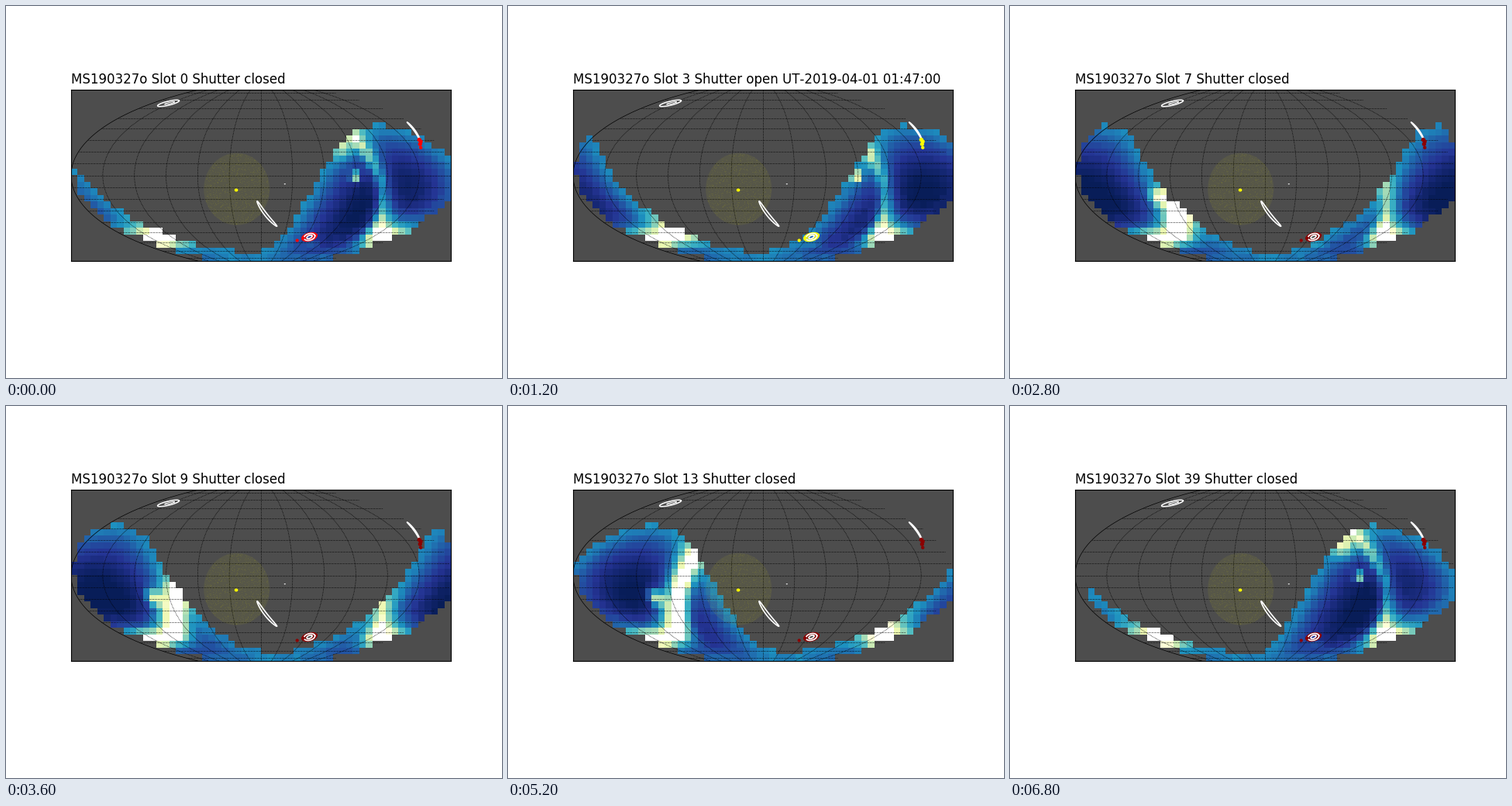
Write a matplotlib script that moves like this. It is 640 px wide and 480 px high and loops after 7.2 s.

```python
import numpy as np
import matplotlib.pyplot as plt
from matplotlib.animation import FuncAnimation
from matplotlib.patches import Ellipse, RegularPolygon

plt.rcParams["text.kerning_factor"] = 6

LEFT, RIGHT, TOP, BOTTOM = 84.0, 574.0, 108.3, 328.9
CX, CY = (LEFT + RIGHT) / 2, (TOP + BOTTOM) / 2
HALF_W, HALF_H = (RIGHT - LEFT) / 2, (BOTTOM - TOP) / 2
COLS, ROWS = 58, 26
NSIDE = 32
SLOTS = list(range(17)) + [39]
OPEN_SLOT = 3
SITE_LAT, ZENITH_LIMIT = -30.17, 64.5


def project(ra, dec, cx=CX, cy=CY):
    """McBryde-Thomas flat-polar quartic, degrees to pixels."""
    t = np.linspace(-np.pi / 2, np.pi / 2, 4001)
    theta = np.interp((1 + np.sqrt(0.5)) * np.sin(np.radians(dec)),
                      np.sin(t / 2) + np.sin(t), t)
    width = (1 + 2 * np.cos(theta) / np.cos(theta / 2)) / 3
    x = cx + HALF_W * ra / 180 * width
    y = cy - HALF_H * np.sin(theta / 2) / np.sqrt(0.5)
    return x, y


def healpix_centres(n):
    """RA (-180..180) and Dec of all pixel centres, ring by ring."""
    ra, dec = [], []
    for i in range(1, 4 * n):
        k = min(i, 4 * n - i)
        if k < n:
            z, count, shift = 1 - k * k / (3 * n * n), 4 * k, 0.5
            z = z if i < n else -z
        else:
            z, count = 4 / 3 - 2 * i / (3 * n), 4 * n
            shift = 0.5 * ((i - n + 1) % 2)
        ra.append((np.arange(count) + shift) * 360 / count)
        dec.append(np.full(count, np.degrees(np.arcsin(z))))
    return (np.concatenate(ra) + 180) % 360 - 180, np.concatenate(dec)


def separation(ra, dec, ra0, dec0):
    a, d, d0 = np.radians(ra - ra0), np.radians(dec), np.radians(dec0)
    c = np.sin(d) * np.sin(d0) + np.cos(d) * np.cos(d0) * np.cos(a)
    return np.degrees(np.arccos(np.clip(c, -1, 1)))


def dust(ra, dec):
    """Depth lost to the Milky Way and a few nearby clouds."""
    a, d, pole = np.radians(ra - 192.86), np.radians(dec), np.radians(27.13)
    b = 90 - separation(ra, dec, 192.86, 27.13)
    lon = 122.93 - np.degrees(np.arctan2(
        np.cos(d) * np.sin(a),
        np.sin(d) * np.cos(pole) - np.cos(d) * np.sin(pole) * np.cos(a)))
    strength = np.interp(lon % 360,
                         [0, 60, 120, 180, 210, 235, 260, 285, 330, 360],
                         [2.3, 1.8, 1.2, 0.9, 0.55, 0.45, 0.8, 1.9, 2.1, 2.3])
    loss = strength * np.exp(-np.abs(b) / np.where(b > 0, 6.5, 4))
    clouds = [(84, -6, 1.0, 3.5), (70, 22, 0.65, 10), (247, -24, 0.75, 6),
              (80, -69, 0.15, 4)]
    for ra0, dec0, amount, size in clouds:
        loss += amount * np.exp(-(separation(ra, dec, ra0, dec0) / size) ** 2)
    ripple = np.sin(ra * 0.61 + dec * 0.37) * np.sin(dec * 0.53 - ra * 0.29)
    return loss + 0.025 * ripple


# Sky samples and the cell each one falls in
ra, dec = healpix_centres(NSIDE)
px, py = project(ra, dec, CX + 8, CY - 7.55)
col = np.floor((px - LEFT) / (RIGHT - LEFT) * COLS).astype(int)
row = np.floor((py - TOP) / (BOTTOM - TOP) * ROWS).astype(int)
inside = (col >= 0) & (col < COLS) & (row >= 0) & (row < ROWS)
ra, dec = ra[inside], dec[inside]
cell = (row * COLS + col)[inside]
loss = dust(ra, dec)

cmap = plt.get_cmap("YlGnBu").copy()
cmap.set_under("white")
cmap.set_bad((0, 0, 0, 0))


def depth_map(slot):
    zenith = separation(ra, dec, 118 + 9 * slot, SITE_LAT)
    up = zenith < ZENITH_LIMIT
    airmass = 1 / np.cos(np.radians(zenith[up]))
    depth = 1.03 - 0.47 * np.log(airmass) - loss[up]
    size = COLS * ROWS
    count = np.bincount(cell[up], minlength=size)
    total = np.bincount(cell[up], depth, minlength=size)
    mean = np.full(size, np.nan)
    mean[count > 0] = total[count > 0] / count[count > 0]
    return np.ma.masked_invalid(mean.reshape(ROWS, COLS))


fig = plt.figure(figsize=(6.4, 4.8), dpi=100)
ax = fig.add_axes([LEFT / 640, 1 - BOTTOM / 480,
                   (RIGHT - LEFT) / 640, (BOTTOM - TOP) / 480])
ax.set_facecolor("0.3")
sky = ax.imshow(depth_map(0), cmap=cmap, vmin=0, vmax=1, aspect="auto",
                interpolation="nearest", extent=(LEFT, RIGHT, BOTTOM, TOP))
ax.set(xlim=(LEFT, RIGHT), ylim=(BOTTOM, TOP), xticks=[], yticks=[])

# Graticule
lats = np.linspace(-90, 90, 361)
grid = dict(color="black", lw=0.5, zorder=2)
for lon in range(-180, 180, 30):
    style = "-" if lon == -180 else (0, (1, 1))
    ax.plot(*project(np.full_like(lats, lon), lats), ls=style, **grid)
for lat in range(-80, 90, 10):
    ax.plot(*project(np.array([-180.0, 180.0]), np.full(2, lat)),
            ls=(0, (1, 1)), **grid)

# Faint yellow field
ax.add_patch(Ellipse((297.7, 236.2), 85, 93, fc="yellow", alpha=0.06,
                     lw=0, zorder=3))
rng = np.random.default_rng(7)
ang, rad = rng.uniform(0, 2 * np.pi, 900), np.sqrt(rng.uniform(0, 1, 900))
ax.scatter(297.7 + 42 * rad * np.cos(ang), 236.2 + 46 * rad * np.sin(ang),
           s=0.35, c="yellow", alpha=0.06, lw=0, zorder=3)


def ring(x, y, a, b, angle, bend=0, color="white", lw=1.3, z=5):
    t = np.linspace(0, 2 * np.pi, 80)
    u, v = a * np.cos(t), b * np.sin(t) + bend * (np.sin(t) ** 2 - 0.5)
    c, s = np.cos(np.radians(angle)), np.sin(np.radians(angle))
    return ax.plot(x + u * c - v * s, y + u * s + v * c,
                   color=color, lw=lw, zorder=z)[0]


ring(209.5, 125.5, 14.3, 2.6, -13.5, lw=1.1)
ring(211, 125.3, 6.5, 0.9, -13.5, lw=0.7)
ring(336, 268.5, 20.5, 1.7, 51.8, 1.8, lw=1.2)
ring(526.5, 161, 14.2, 0.7, 54, -1.5, lw=1.2)
ring(391.5, 298, 7.3, 4.2, -15, lw=1.2)
ring(391.5, 298, 3.6, 1.9, -25, lw=1.2)
ring(297, 237.5, 1.4, 1.2, 0, color="yellow", lw=1.2)
ax.add_patch(Ellipse((359.8, 229.7), 2.2, 1.2, fc="white", lw=0, zorder=5))

# Pointings, coloured by their state
halo = [ring(391.5, 298, 9.6, 4.7, -15, lw=1.5, z=4),
        ring(391.5, 298, 5.5, 2.9, -15, lw=0.9, z=4)]
dots = [ax.add_patch(RegularPolygon(p, 6, radius=r, lw=0, zorder=6))
        for p, r in [((375.7, 302.5), 2.3), ((383.5, 299.5), 2.2),
                     ((533.3, 172.6), 3.0), ((535.2, 174.8), 2.8),
                     ((534.3, 178.2), 2.9), ((535.2, 182.7), 2.4)]]
title = ax.set_title("", loc="left", fontsize=12)


def update(i):
    slot = SLOTS[i]
    sky.set_data(depth_map(slot))
    state = "closed"
    color = "red" if slot < OPEN_SLOT else "darkred"
    if slot == OPEN_SLOT:
        state, color = "open UT-2019-04-01 01:47:00", "yellow"
    for line in halo:
        line.set_color(color)
    for dot in dots:
        dot.set_facecolor(color)
    title.set_text(f"MS190327o Slot {slot} Shutter {state}")
    return [sky, title, *halo, *dots]


anim = FuncAnimation(fig, update, frames=len(SLOTS), interval=400,
                     repeat=True, repeat_delay=0, blit=False)
plt.show()
```
